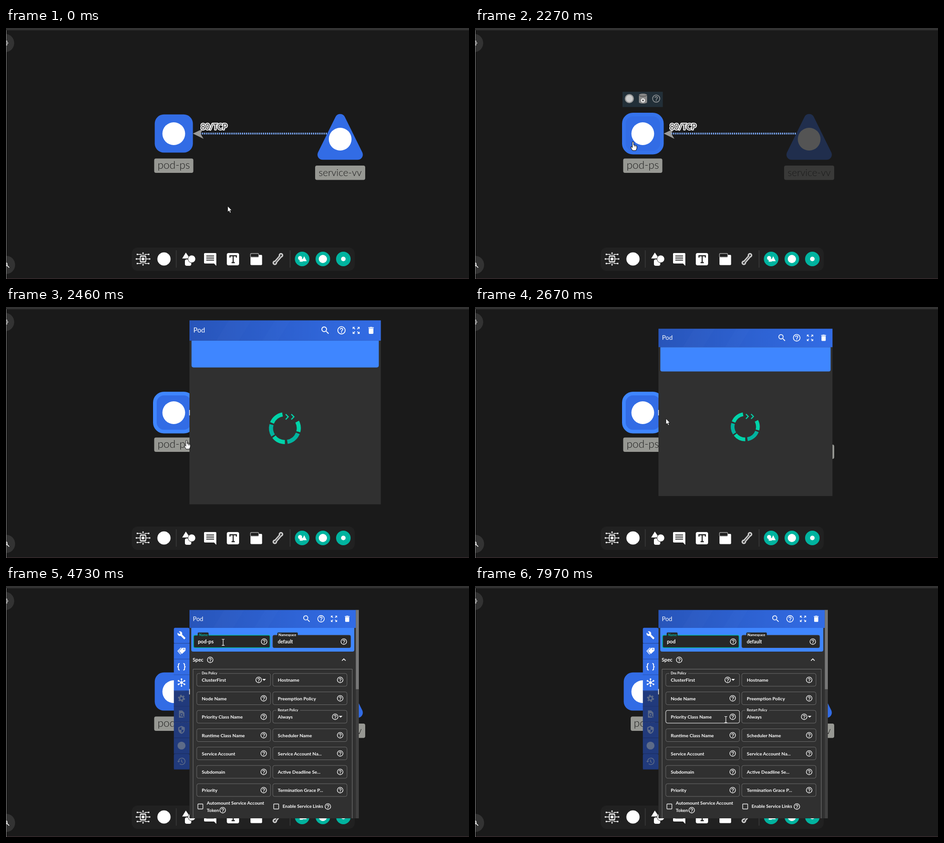
An HTML page for the animation above (8 s loop, 1017x551 px).

```html
<!DOCTYPE html>
<html lang="en">
<head>
<meta charset="utf-8">
<title>Pod editor</title>
<style>
html, body { margin: 0; width: 100%; height: 100%; overflow: hidden; background: #1a1a1a; }
svg { display: block; width: 100%; height: 100%; }
text { font-family: Lato, "Open Sans", sans-serif; }
</style>
</head>
<body>
<svg id="stage" viewBox="0 0 1017 551" xmlns="http://www.w3.org/2000/svg"></svg>
<script>
const LOOP = 8000;
const BLUE = '#326ce5', BRIGHT = '#3f86ff', TEAL = '#00b39f', MINT = '#00d3a9', BODY = '#303030', NAVY = '#213a7c';

const rect = (x, y, w, h, fill, r = 0, extra = '') =>
  `<rect x="${x}" y="${y}" width="${w}" height="${h}" rx="${r}" fill="${fill}" ${extra}/>`;
const circle = (x, y, r, fill, extra = '') => `<circle cx="${x}" cy="${y}" r="${r}" fill="${fill}" ${extra}/>`;
const path = (d, fill, extra = '') => `<path d="${d}" fill="${fill}" ${extra}/>`;
const line = (d, color, width = 1, extra = '') =>
  path(d, 'none', `stroke="${color}" stroke-width="${width}" ${extra}`);
const label = (s, x, y, size, fill = '#fff', extra = '') =>
  `<text x="${x}" y="${y}" font-size="${size}" fill="${fill}" ${extra}>${s}</text>`;
const bold = (s, x, y, size, fill = '#fff', extra = '') => label(s, x, y, size, fill, `font-weight="700" ${extra}`);
const group = (id, content) => `<g id="${id}">${content}</g>`;

// Icons live on a 24 unit grid and are placed by their centre.
const icon = (content, x, y, size) =>
  `<g transform="translate(${x - size / 2} ${y - size / 2}) scale(${size / 24})">${content}</g>`;
const turned = (angles, content, x = 12, y = 12) =>
  angles.map(a => `<g transform="rotate(${a} ${x} ${y})">${content}</g>`).join('');
const glyph = {
  search: c => path('M15.5 14h-.8l-.3-.3a6.5 6.5 0 1 0-.7.7l.3.3v.8l5 5 1.5-1.5zM9.5 14a4.5 4.5 0 1 1 0-9 4.5 4.5 0 0 1 0 9z', c),
  help: c => circle(12, 12, 9, 'none', `stroke="${c}" stroke-width="2"`) +
    path('M11 18h2v-2h-2zM12 6a4 4 0 0 0-4 4h2a2 2 0 1 1 4 0c0 2-3 1.8-3 5h2c0-2.3 3-2.5 3-5a4 4 0 0 0-4-4z', c),
  expand: c => turned([0, 90, 180, 270], path('M15 3l2.3 2.3-2.9 2.9 1.4 1.4 2.9-2.9L21 9V3z', c)),
  trash: c => path('M6 19a2 2 0 0 0 2 2h8a2 2 0 0 0 2-2V7H6zM19 4h-3.5l-1-1h-5l-1 1H5v2h14z', c),
  wrench: c => path('M22.7 19l-9.1-9.1c.9-2.3.4-5-1.5-6.9-2-2-5-2.4-7.4-1.3L9 6 6 9 1.6 4.7C.4 7.1.9 10.1 2.9 12.1c1.9 1.9 4.6 2.4 6.9 1.5l9.1 9.1c.4.4 1 .4 1.4 0l2.3-2.3c.5-.4.5-1.1.1-1.4z', c),
  tags: c => path('M23 3h-9l-9 9 8 8 10-9z', c) + line('M11 3l-9 9 8 9', c, 2) + circle(18.5, 7, 1.6, BLUE),
  braces: c => turned([0, 180], line('M7 3Q3.500 3 3.500 6V9Q3.500 12 .5 12Q3.500 12 3.500 15V18Q3.500 21 7 21', c, 2.4)),
  hub: c => circle(12, 12, 3.6, c) + turned([0, 60, 120, 180, 240, 300], line('M12 12V3', c, 1.7) + circle(12, 2.5, 2.3, c)),
  gear: c => circle(12, 12, 5.3, 'none', `stroke="${c}" stroke-width="4"`) +
    circle(12, 12, 8.4, 'none', `stroke="${c}" stroke-width="3" stroke-dasharray="4.4"`),
  inspect: c => path('M5 2h9l6 6v14H5z', c) + circle(12, 14, 3.6, c, `stroke="${NAVY}" stroke-width="2"`) +
    line('M15 17l4 4', NAVY, 2),
  shield: c => path('M12 1l9 4v6c0 5.5-3.8 10.7-9 12-5.2-1.3-9-6.5-9-12V5z', c) +
    path('M12 4v8h6c-.5 3.8-3 7-6 8v-8H6V6.5z', NAVY),
  dot: c => circle(12, 12, 11, c),
  history: c => line('M4 12a9 9 0 1 1 3 6.5M12 7v6l4 2', c, 2) + path('M0 11h8l-4 4z', c)
};
const help = (x, y, size = 16.5) => icon(glyph.help('#fff'), x, y, size);

function frameEdges() {
  return rect(0, 0, 1017, 5, '#333') + rect(1, 549.5, 1016, 1.5, '#3a2c30') +
    circle(-2, 33, 20, '#333') + circle(-1, 33, 2.5, '#fff') + line('M0 28l3 2M0 33h5M0 38l3-2', '#fff', 1.6) +
    circle(0, 520, 20, '#333') + line('M0 515a4.5 4.5 0 0 1 0 8M2 521l5 5', '#fff', 1.7) +
    rect(0, 5, 1, 546, '#8b8b8b');
}

function chipIcon() {
  const half = line('M307 507h7M305 500v-3h7M305 514v3h7M301 500v-5', '#fff', 1.3) +
    circle(315.5, 507, 1.7, '#fff') + circle(313.5, 497, 1.7, '#fff') +
    circle(313.5, 517, 1.7, '#fff') + circle(301, 494, 1.5, '#fff');
  return turned([0, 180], half, 301, 507) +
    rect(295, 501, 12, 12, '#212121', 1, 'stroke="#fff" stroke-width="1.8"') + rect(298, 504, 6, 6, '#fff');
}

function toolbar() {
  return rect(276, 482, 490, 51, '#212121', 13) + line('M374 488v38M624 488v38', '#484848') +
    chipIcon() + circle(347, 507, 14.5, '#fff') +
    path('M395 493l9 13h-17z', '#fff') +
    rect(393, 508, 14, 14, '#fff', 4) + circle(408, 507, 8.3, '#fff', 'stroke="#212121"') +
    path('M437 494h23q2 0 2 2v26l-5-5h-20q-2 0-2-2v-19q0-2 2-2z', '#fff') +
    line('M440 500.5h17M440 505h17M440 509.5h17', '#212121', 2) +
    rect(485, 494, 27, 27, '#fff', 4) + line('M492 504v-4h14v4M499 500v15M495.5 515h7', '#212121', 2.4) +
    rect(537, 498, 25.5, 22.5, '#fff', 2) + rect(537, 495, 18, 8, '#212121', 2, 'stroke="#aaa" stroke-width="1.3"') +
    line('M591 515l13-15', '#ccc', 7) + circle(590.5, 515.5, 5, '#ccc') + circle(604, 499, 5, '#ccc') +
    line('M591 515l13-15', '#333', 1.4) + circle(590.5, 515.5, 2, '#333') + circle(604, 499, 2, '#333') +
    [650.5, 696, 741].map(x => circle(x, 507, 16, TEAL)).join('') +
    circle(646, 505, 4.5, '#fff') + path('M655 501l5.5 11h-11z', '#fff') + rect(645, 507, 7, 6, '#fff', 1) +
    circle(696, 507, 9, '#fff') + circle(741, 507, 5, '#fff');
}

const nodeLabel = (id, s, cx, y, w, size) => group(id,
  rect(cx - w / 2, y, w, 31.5, '#979893', 4) +
  label(s, cx, y + 22.5, size, '#1c1c1c', 'text-anchor="middle" font-weight="300"'));

function diagram() {
  return group('service',
      path('M734 200L695.5 278h77z', BLUE, `stroke="${BLUE}" stroke-width="22.6" stroke-linejoin="round"`) +
      circle(734, 244, 25, '#fff') + nodeLabel('serviceLabel', 'service-vv', 734, 302, 110, 21.6)) +
    line('M426 231.8H706', '#7ba8f4', 4, 'stroke-dasharray="2.7 1.9"') +
    group('arrow', path('M410.5 231.8L433 221l-6 10.8 7 11.5z', '#9a9a98')) +
    label('80/TCP', 428, 222.5, 16.8, '#222', 'stroke="#fff" stroke-width="4" stroke-linejoin="round" paint-order="stroke"') +
    rect(326.7, 189.8, 83.8, 83.8, BLUE, 20) +
    group('ring', rect(327, 190, 83.5, 83.5, 'none', 20, 'stroke-width="8"')) +
    circle(368.5, 232, 25, '#fff') +
    nodeLabel('longLabel', 'pod-ps', 368.5, 286.5, 86, 23.7) +
    nodeLabel('shortLabel', 'pod', 368.5, 286.5, 53, 23.7) +
    group('quickBar', rect(324, 140, 88.5, 33.5, '#222f38') +
      circle(339, 155, 10, '#999') + circle(339, 155, 7.5, '#ccc') +
      path('M360 147a9 3 0 0 1 18 0v16a9 3 0 0 1-18 0z', '#888') +
      line('M360 147a9 3 0 0 0 18 0', '#333') + circle(369, 159, 4.5, '#eee') + circle(369, 159, 2, '#555') +
      icon(glyph.help('#8b8f92'), 398, 155, 21));
}

function header(right, shift) {
  return rect(403, 52.6, right - 403, 39.4, 'url(#head)') +
    path('M455 92l24-39h44l-24 39zM545 92l24-39h30l-24 39z', '#fff', 'opacity=".012"') +
    label('Pod', 410.5, 76.5, 13.4) +
    icon(glyph.search('#fff'), 667 + shift, 72, 20) + help(698.5 + shift, 72, 19) +
    icon(glyph.expand('#fff'), 727 + shift, 72, 18) + icon(glyph.trash('#fff'), 756 + shift, 72, 18);
}
const band = w => path(`M407 92h${w}v48q0 4-4 4h${8 - w}q-4 0-4-4z`, BRIGHT);

function loader() {
  const point = deg => {
    const a = deg * Math.PI / 180;
    return `${588.5 + 27 * Math.sin(a)} ${262 - 27 * Math.cos(a)}`;
  };
  const arcs = [[62, 105, MINT], [112, 170, TEAL], [180, 232, MINT], [238, 285, TEAL], [292, 350, MINT]];
  return rect(403, 53, 372, 357, BODY) + band(364) + header(775, 0) +
    arcs.map(([a, b, c]) => line(`M${point(a)}A27 27 0 0 1 ${point(b)}`, c, 8)).join('') +
    line('M590 235l5 5-5 5M601 235l5 5-5 5', MINT, 2.2);
}

const LEFT = { x: 419, w: 162 }, RIGHT = { x: 586, w: 163 };
const ROWS = [206, 246.5, 287, 327.5, 367.5, 408, 448];
const GRID = [
  ['ClusterFirst', 'Hostname'], ['Node Name', 'Preemption Policy'], ['Priority Class Name', 'Always'],
  ['Runtime Class Name', 'Scheduler Name'], ['Service Account', 'Service Account Na...'],
  ['Subdomain', 'Active Deadline Se...'], ['Priority', 'Termination Grace P...']
];
const CAPTIONS = { ClusterFirst: ['Dns Policy', 37], Always: ['Restart Policy', 48] };

function field(s, col, y, id) {
  const end = col.x + col.w, cap = CAPTIONS[s];
  let out = rect(col.x, y - 14, col.w, 28, 'none', 4, `id="${id}" stroke="#6c6c6c"`) +
    bold(s, col.x + 11, y + 4, 10.3);
  if (cap) {
    out += rect(col.x + 8, y - 18, cap[1] + 4, 8, BODY) + bold(cap[0], col.x + 11, y - 12.5, 7.3) +
      help(end - 26, y) + path(`M${end - 18} ${y - 2}h8l-4 4z`, '#fff');
  } else out += help(end - 15, y);
  return out;
}

function form() {
  const cells = GRID.map((row, i) => field(row[0], LEFT, ROWS[i], 'left' + i) + field(row[1], RIGHT, ROWS[i], 'right' + i)).join('');
  const box = x => rect(x, 478.5, 11, 11, 'none', 1, 'stroke="#eee" stroke-width="1.4"');
  return rect(403, 53, 372, 457, BODY) + band(358) + header(769, -6.5) +
    rect(768.5, 52.6, 6.5, 457.4, '#404040') + rect(768.5, 52.6, 6.5, 174, '#777') +
    rect(412, 108, 168, 27.5, '#272727', 3, 'id="nameBox" stroke-width="1.5"') + rect(421, 102, 24, 10, '#272727', 2) +
    bold('Name', 424, 110, 7.4, '#fff', 'id="nameLabel"') +
    bold('pod-ps', 421.5, 126, 11.2, '#fff', 'id="nameText"') + help(567, 122) +
    rect(586, 108, 171, 27.5, '#272727', 3, 'stroke="#3c3c3c"') + rect(596, 102, 45, 10, '#272727', 2) +
    bold('Namespace', 598.5, 110, 7.6) + bold('default', 597, 126, 10.6) + help(742, 122) +
    bold('Spec', 410, 166, 11.2) + help(448.5, 162) +
    line('M738 164l4-4 4 4', '#fff', 1.6) + line('M411 510V182.5H760.5V510', '#777') + cells +
    box(421.5) + bold('Automount Service Account', 441, 479.5, 10.1) + bold('Token', 441, 495.5, 10.1) + help(476, 492) +
    box(588) + bold('Enable Service Links', 607.5, 487, 9.9) + help(707, 484);
}

function tabs() {
  const names = ['wrench', 'tags', 'braces', 'hub', 'gear', 'inspect', 'shield', 'dot', 'history'];
  return names.map((name, i) => {
    const y = 91.7 + i * 34.6, on = i < 4;
    return rect(368.7, y, 34.3, 34.6, on ? BLUE : NAVY, i % 8 ? 0 : 3) +
      rect(368.7, y + 33.6, 34.3, 1, on ? '#2149a0' : '#1a2d60') +
      icon(glyph[name](on ? '#fff' : '#5d6b88'), 385.5, y + 16.5, 19);
  }).join('');
}

function cursors() {
  return group('pointer', path('M0 0v13l3-2.8 2 4.8 2.2-1-2-4.6H9z', '#fff', 'stroke="#000" stroke-width=".8"')) +
    group('hand', path('M-1.5 1q0-1.5 1.5-1.5T1.500 1v6q5 .3 7 2v5l-2 5H-1l-4-7q0-2 2-1l1.5 1.5z', '#fff', 'stroke="#000"') +
      line('M3.8 8v3M6.2 8.5v3', '#000', .7)) +
    group('beam', line('M-3-6.5h2.3q.7 0 .7.8V6q0 .8-.7.8H-3M3-6.5H.7Q0-6.5 0-5.7V6q0 .8.7.8H3', '#fff', 1.2));
}

const stage = document.getElementById('stage');
stage.innerHTML =
  `<defs><linearGradient id="head"><stop stop-color="#2855ba"/><stop offset="1" stop-color="${BLUE}"/></linearGradient></defs>` +
  rect(0, 0, 1017, 551, '#1a1a1a') + frameEdges() + diagram() + toolbar() +
  group('tabs', tabs()) + group('loader', loader()) + group('form', form()) +
  group('edgeTick', rect(402.3, 226, 1.5, 12, '#eee')) + cursors();

const $ = id => document.getElementById(id);
const show = (id, on) => $(id).setAttribute('visibility', on ? 'visible' : 'hidden');
const set = (id, name, value) => $(id).setAttribute(name, value);
const part = (t, a, b) => Math.min(1, Math.max(0, (t - a) / (b - a)));
const smooth = u => u * u * (3 - 2 * u);

// Each move: start, end, then the points it joins.
const MOVES = [[1080, 1870, 487, 391, 347, 250], [2310, 2460, 347, 250, 396.5, 293],
  [2460, 3060, 396.5, 293, 477, 123.5], [7280, 7970, 477, 123.5, 551, 293]];

function cursorAt(t) {
  const [a, b, x0, y0, x1, y1] = MOVES.filter(m => t >= m[0]).pop() || MOVES[0];
  const u = smooth(part(t, a, b));
  return [x0 + (x1 - x0) * u, y0 + (y1 - y0) * u];
}

function render(t) {
  const selected = t >= 2270 && t < 4270, renamed = t >= 6750;
  const open = t >= 2400, ready = t >= 3440, focused = t >= 4270;

  set('service', 'opacity', 1 - .75 * (part(t, 1900, 2070) - part(t, 2500, 2650)));
  set('quickBar', 'opacity', part(t, 1900, 2070));
  show('quickBar', t >= 1900 && !open);
  show('ring', selected);
  const tone = part(t, 2230, 2390);
  set('ring', 'stroke', `rgb(${50 + 13 * tone},${108 + 26 * tone},${229 + 26 * tone})`);
  set('arrow', 'transform', `translate(${selected ? 4 : 0} 0)`);
  show('longLabel', !renamed);
  show('shortLabel', renamed);

  const scale = 1.13 - .13 * smooth(part(t, 2460, 2760));
  set('loader', 'transform', `translate(403 231.5) scale(${scale}) translate(-403 -231.5)`);
  show('loader', open && !ready);
  show('form', ready);
  show('tabs', ready);
  set('tabs', 'opacity', part(t, 3440, 3700));
  show('edgeTick', open);

  set('nameBox', 'stroke', focused ? TEAL : '#3c3c3c');
  set('nameLabel', 'fill', focused ? TEAL : '#fff');
  $('nameText').textContent = t < 6290 ? 'pod-ps' : 'pod';

  const [x, y] = cursorAt(t);
  let overText = t >= 3000 && y < 135;
  ROWS.forEach((row, i) => {
    const hit = t >= 7280 && Math.abs(y - row) < 14;
    set('left' + i, 'stroke', hit ? '#fff' : '#6c6c6c');
    overText = overText || hit;
  });
  const kind = overText ? 'beam' : t >= 1900 && t < 2490 ? 'hand' : 'pointer';
  for (const id of ['pointer', 'hand', 'beam']) {
    show(id, id === kind);
    set(id, 'transform', `translate(${x} ${y})`);
  }
  set('beam', 'opacity', ready ? 1 : .4);
}

const start = performance.now();
function tick() {
  render((performance.now() - start) % LOOP);
  requestAnimationFrame(tick);
}
tick();
</script>
</body>
</html>
```
